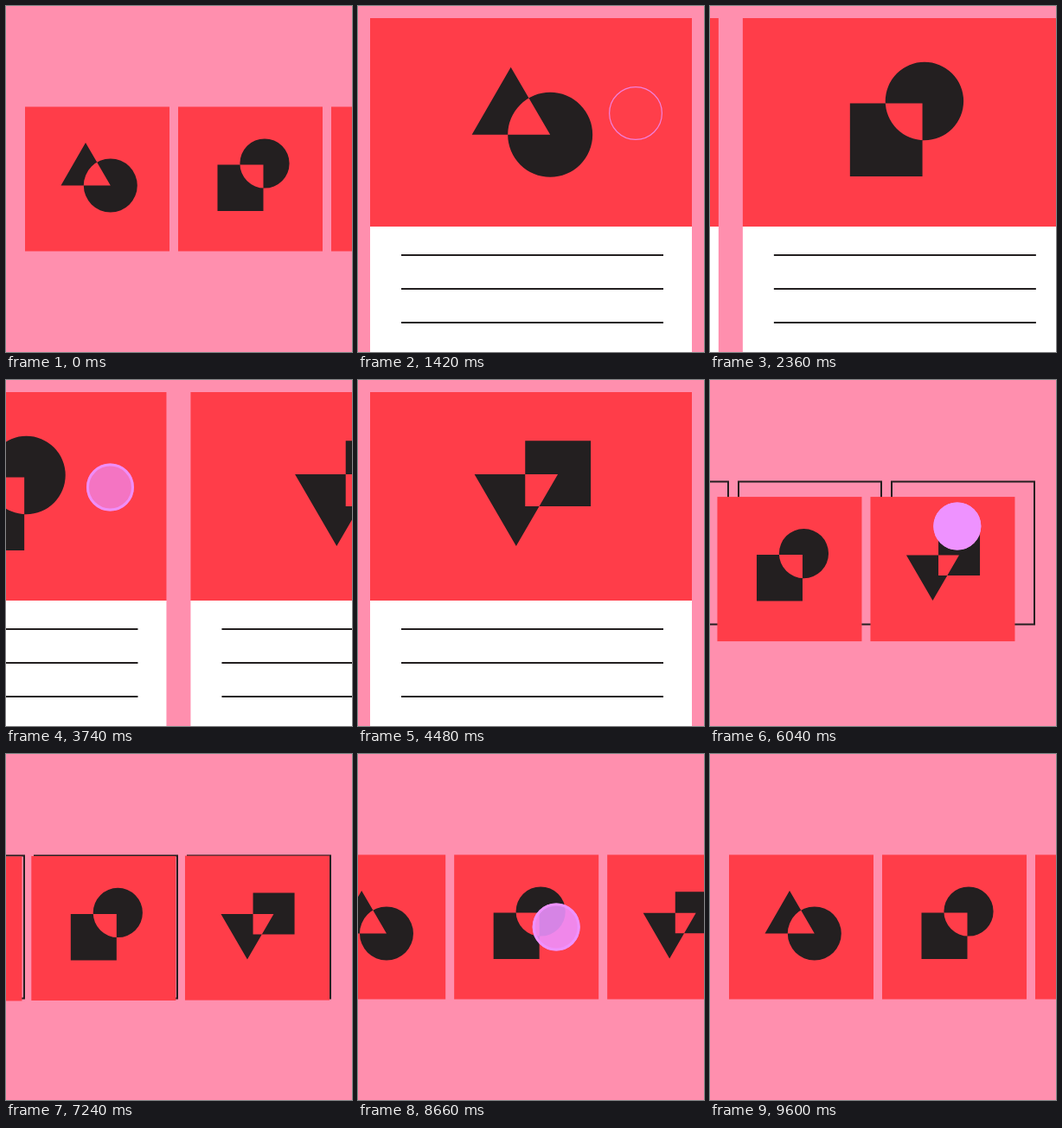
Write an HTML page with a canvas that moves like this. It is 400 by 400 pixels and loops after 10000 ms.

```html
<!DOCTYPE html>
<html>
<head>
<meta charset="utf-8">
<title>Card carousel</title>
<style>
  html, body { margin: 0; height: 100%; overflow: hidden; background: #ff8fae; }
  canvas { display: block; width: 100vw; height: 100vh; }
</style>
</head>
<body>
<canvas width="400" height="400"></canvas>
<script>
const canvas = document.querySelector('canvas');
const ctx = canvas.getContext('2d');
const PINK = '#ff8fae', RED = '#ff3d49', INK = '#231f20', LILAC = '#ee92ff';
const LOOP = 10000, RELEASE = 7000;

const clamp = v => Math.min(1, Math.max(0, v));
const mix = (a, b, k) => a + (b - a) * k;
const ramp = (t, from, to) => clamp((t - from) / (to - from));
const ease = (t, from, to) => {
  const u = ramp(t, from, to);
  return u < 0.5 ? 4 * u ** 3 : 1 - 4 * (1 - u) ** 3;
};

function polygon(...points) {
  points.forEach(([x, y], i) => i ? ctx.lineTo(x, y) : ctx.moveTo(x, y));
  ctx.closePath();
}

function disc(x, y, r) {
  ctx.moveTo(x + r, y);
  ctx.arc(x, y, r, 0, Math.PI * 2);
}

// Emblems are drawn around the middle of the red panel; shift applies when open.
const emblems = [
  { shift: [-2, 2.5], path() {
    polygon([-13.5, -42], [15.3, 7.5], [-42, 7.5]);
    disc(15.3, 7.5, 31);
  } },
  { shift: [-2, 4], path() {
    ctx.rect(-38, -16.5, 53, 53.5);
    disc(16.5, -18, 28.6);
  } },
  { shift: [1, 0], path() {
    polygon([-42, -16.2], [19, -16.2], [-11.5, 36.4]);
    ctx.rect(-4.9, -40.7, 48, 48);
  } }
];

function drawCard({ x, y, w, h }, emblem, p) {
  const scale = w / 372, bottom = y + h, body = 360 * (1 - p);
  ctx.fillStyle = '#fff';
  ctx.fillRect(x, bottom, w, body);
  ctx.fillStyle = INK;
  ctx.globalAlpha = clamp(1 - 1.3 * p);
  for (const row of [33, 72, 111]) {
    const ly = row * scale;
    if (ly < body) ctx.fillRect(x + 36 * scale, bottom + ly - scale, 303 * scale, 2 * scale);
  }
  ctx.globalAlpha = 1;
  ctx.fillStyle = RED;
  ctx.fillRect(x, y, w, h);

  const size = mix(1.58, 1, p), [sx, sy] = emblem.shift;
  ctx.save();
  ctx.translate(x + w / 2 + sx * (1 - p), y + h / 2 + sy * (1 - p));
  ctx.scale(size, size);
  ctx.beginPath();
  emblem.path();
  ctx.fillStyle = INK;
  ctx.fill('evenodd');
  ctx.restore();
}

// A ring that fills on press, then fades after the release.
function drawTouch(t, start, release, x, y) {
  if (t < start || t > release + 180) return;
  const press = ramp(t, start, start + 260), fade = ramp(t, release, release + 180);
  const r = mix(31, 27.5, press), line = mix(1.2, 3, press);
  ctx.fillStyle = ctx.strokeStyle = LILAC;
  ctx.beginPath();
  disc(x, y, r);
  ctx.globalAlpha = press * (1 - fade);
  ctx.fill();
  ctx.globalAlpha = mix(0.8, 1, press) * (1 - fade * fade);
  ctx.lineWidth = line;
  ctx.beginPath();
  disc(x, y, r - line / 2);
  ctx.stroke();
  ctx.globalAlpha = 1;
}

function draw(t) {
  const closing = ease(t, 5020, 5760);
  const p = t < 3000 ? 1 - ease(t, 300, 1040) : closing;
  const swipe1 = ease(t, 1528, 2633), swipe2 = ease(t, 3188, 4293);
  const back = ease(t, 8047, 9297);
  const scroll = t < 3000 ? 0 : 167 * (1 - back);
  const slotX = i => 22 + 177 * i - scroll;

  // While held, the shrunken cards hang off their slots and sway a little.
  const sway = Math.sin((Math.min(t, RELEASE) - Math.min(t, 5760)) / 400);
  const cards = emblems.map((_, i) => {
    const late = t - RELEASE - 25 * (2 - i);
    const hold = closing * Math.exp(-Math.max(0, late) / 90);
    return {
      x: mix(14 + 400 * (i - swipe1 - swipe2), slotX(i), p) + hold * (10 * sway - 30),
      y: mix(14, 116.5, p) + hold * (16 + 4 * sway),
      w: mix(372, 167, p),
      h: mix(241, 167, p)
    };
  });

  ctx.fillStyle = PINK;
  ctx.fillRect(0, 0, 400, 400);
  if (closing && t < 7900) {
    ctx.globalAlpha = clamp(closing * 2);
    ctx.strokeStyle = INK;
    ctx.lineWidth = 2;
    emblems.forEach((_, i) => ctx.strokeRect(slotX(i) + 1, 117.5, 165, 165));
    ctx.globalAlpha = 1;
  }
  cards.forEach((card, i) => drawCard(card, emblems[i], p));

  const held = cards[2];
  drawTouch(t, 60, 420, 105, 200);
  drawTouch(t, 1420, 2020, 321 - 400 * swipe1, 124);
  drawTouch(t, 3080, 3680, 321 - 400 * swipe2, 124);
  drawTouch(t, 4700, RELEASE, held.x + 0.601 * held.w, held.y + 0.203 * held.h);
  drawTouch(t, 7980, 8640, 150 + 167 * back, 200);
}

const begin = performance.now();
function tick() {
  draw((performance.now() - begin) % LOOP);
  requestAnimationFrame(tick);
}
tick();
</script>
</body>
</html>
```
